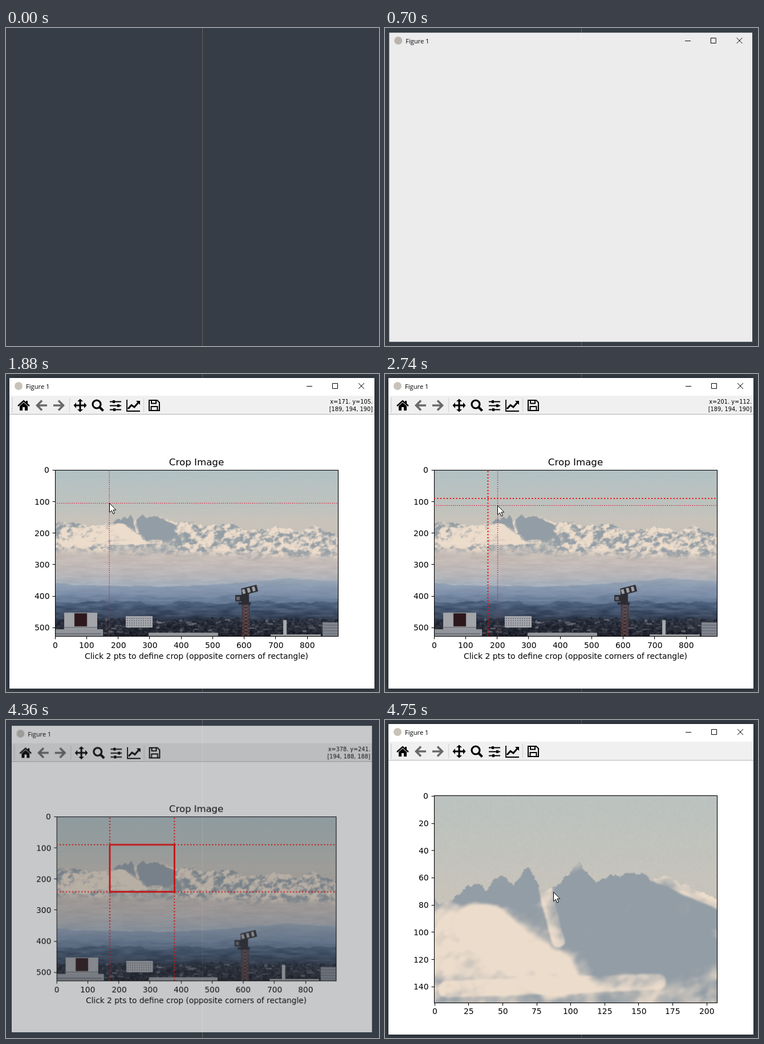
Write an HTML page with a canvas that moves like this. It is 654 px wide and 557 px high and loops after 6.62 s.

```html
<!DOCTYPE html>
<html lang="en">
<head>
<meta charset="utf-8">
<title>Crop Image</title>
<style>
html, body { margin: 0; width: 100%; height: 100%; overflow: hidden; background: #363d46; }
canvas { display: block; }
</style>
</head>
<body>
<canvas id="stage" width="654" height="557"></canvas>
<script>
const W = 654, H = 557, LOOP = 6620;
const IMG_W = 898, IMG_H = 527;
const LEFT = 86, WIDTH = 496;
const ctx = document.getElementById('stage').getContext('2d');

const clamp = v => Math.min(1, Math.max(0, v));
const lerp = (a, b, k) => a + (b - a) * k;
const mix = (a, b, k) => a.map((v, i) => lerp(v, b[i], k));
const smooth = (a, b, v) => { const k = clamp((v - a) / (b - a)); return k * k * (3 - 2 * k); };
const easeOut = k => 1 - (1 - clamp(k)) ** 2;
const rgb = hex => [1, 3, 5].map(i => parseInt(hex.slice(i, i + 2), 16));

function layer(w, h) {
  const c = document.createElement('canvas');
  c.width = w;
  c.height = h;
  return c.getContext('2d');
}

function box(g, x, y, w, h, fill) {
  g.fillStyle = fill;
  g.fillRect(x, y, w, h);
}

function path(g, d, color, width) {
  const p = new Path2D(d);
  if (width) {
    g.strokeStyle = color;
    g.lineWidth = width;
    g.stroke(p);
  } else {
    g.fillStyle = color;
    g.fill(p);
  }
}

function text(g, str, x, y, font, align = 'left') {
  g.font = font;
  g.textAlign = align;
  g.fillStyle = '#000';
  g.fillText(str, x, y);
}

// --- Landscape, in image pixels ---

function hash(i, j) {
  let h = Math.imul(i, 374761393) + Math.imul(j, 668265263);
  h = Math.imul(h ^ (h >>> 13), 1274126177);
  return ((h ^ (h >>> 16)) >>> 0) / 2 ** 32;
}

function noise(x, y) {
  const i = Math.floor(x), j = Math.floor(y);
  const u = smooth(0, 1, x - i), v = smooth(0, 1, y - j);
  return lerp(lerp(hash(i, j), hash(i + 1, j), u), lerp(hash(i, j + 1), hash(i + 1, j + 1), u), v);
}

// Layered noise around zero
function fbm(x, y) {
  return noise(x, y) * .5 + noise(x * 2 + 9, y * 2) * .3 + noise(x * 4, y * 4 + 9) * .2 - .5;
}

function seeded(seed) {
  return () => (seed = (seed * 16807) % 2147483647) / 2147483647;
}

// Piecewise blend through [position, value] stops
function along(stops, x, blend = lerp) {
  const i = stops.findIndex(s => s[0] > x);
  if (i === 0) return stops[0][1];
  if (i < 0) return stops[stops.length - 1][1];
  const [a, b] = [stops[i - 1], stops[i]];
  return blend(a[1], b[1], (x - a[0]) / (b[0] - a[0]));
}

const ramp = (...stops) => {
  const list = stops.map(([p, c]) => [p, rgb(c)]);
  return y => along(list, y, mix);
};

const SKY = ramp([0, '#b2c1c4'], [53, '#b8c2c1'], [105, '#bdc2be'], [160, '#c7c3bb'], [240, '#c9c0b8']);
const CLOUD = ramp([245, '#cbbfb6'], [300, '#c2bab7'], [330, '#b8b6b8'], [362, '#a6afba']);
const FAR = ramp([345, '#9aa7b6'], [375, '#8797ae'], [415, '#7386a2']);
const MID = ramp([395, '#788ba6'], [425, '#61758f']);
const NEAR = ramp([412, '#566984'], [435, '#475a75'], [470, '#333f53']);
const TOWN = ramp([462, '#2d3443'], [527, '#20232c']);
const SNOW = rgb('#ecdccb'), ROCK = rgb('#939da5');

const SKYLINE = [[0, 162], [110, 177], [171, 170], [218, 152], [229, 154], [240, 144], [251, 160], [260, 160],
  [278, 140], [290, 153], [313, 145], [335, 149], [380, 168], [415, 162], [483, 178], [560, 169], [610, 194],
  [700, 181], [785, 194], [823, 175], [860, 197], [898, 207]];
const HILLTOP = [[0, 358], [90, 366], [360, 369], [550, 360], [730, 343], [898, 352]];

// Snowy (+) and rocky (-) streaks: x1, y1, x2, y2, radius, weight
const STREAKS = [
  [40, 215, 200, 198, 30, .5],
  [205, 185, 258, 222, 17, .8],
  [252, 158, 262, 196, 5, .8],
  [335, 148, 382, 168, 6, .9],
  [180, 232, 335, 226, 6, .6],
  [290, 172, 350, 186, 34, -.7],
  [195, 158, 243, 156, 13, -.6],
  [300, 215, 375, 212, 17, -.35]
];

function streak(x, y, [x1, y1, x2, y2, r, weight]) {
  const dx = x2 - x1, dy = y2 - y1;
  const k = clamp(((x - x1) * dx + (y - y1) * dy) / (dx * dx + dy * dy));
  return weight * smooth(r * 1.25, r * .75, Math.hypot(x - x1 - dx * k, y - y1 - dy * k));
}

function mountain(x, y) {
  const bias = STREAKS.reduce((sum, s) => sum + streak(x, y, s), 0);
  const grain = fbm((x + y * .75) / 17, (y - x * .35) / 15);
  const calm = smooth(150, 190, x) * smooth(400, 360, x);
  return mix(ROCK, SNOW, smooth(-.45, .5, bias * .8 + grain * lerp(2.4, 1.1, calm) + lerp(.08, -.1, calm)));
}

function landscape(x) {
  const top = along(SKYLINE, x) + fbm(x / 11, .5) * 15;
  const far = along(HILLTOP, x) + fbm(x / 30, 3) * 6;
  const mid = 399 + fbm(x / 70, 5) * 26;
  const near = 418 + fbm(x / 60, 7) * 24;
  const town = 471 + fbm(x / 14, 11) * 22;
  return y => {
    const haze = fbm(x / 45, y / 7);
    const tint = (color, amount) => color.map(v => v + amount);
    if (y < top) return tint(SKY(y), (hash(x, y) - .5) * 4);
    if (y < far) {
      const cover = smooth(236, 272, y - x * .025 + haze * 24);
      const cloud = tint(CLOUD(y), haze * 22);
      return cover === 1 ? cloud : mix(mountain(x, y), cloud, cover);
    }
    if (y < mid) return tint(FAR(y), haze * 16);
    if (y < near) return tint(MID(y), haze * 28);
    if (y < town) return tint(NEAR(y), haze * 50);
    return tint(TOWN(y), fbm(x / 7, y / 5) * 60);
  };
}

// Buildings use stage coordinates
function paintTown(g) {
  const rnd = seeded(71);
  for (let i = 0; i < 110; i++) {
    const grey = 100 + rnd() * 70;
    box(g, 165 + rnd() * 415, 427 + rnd() * 26, 2 + rnd() * 9, 1 + rnd() * 3,
      `rgba(${grey},${grey},${grey + 8},${.15 + rnd() * .4})`);
  }
  box(g, 87, 447, 83, 12, '#92959b');
  box(g, 102, 418, 58, 29, '#a3a5a9');
  box(g, 102, 443, 58, 2, '#777a80');
  box(g, 87, 454, 80, 2, '#686c74');
  box(g, 120, 419, 22, 23, '#2d191d');
  box(g, 210, 424, 47, 20, '#a9aaae');
  for (let x = 212; x < 256; x += 4) for (let y = 427; y < 443; y += 4) box(g, x, y, 2, 2, '#6b707b');
  box(g, 250, 453, 122, 6, '#96989d');
  box(g, 464, 456, 88, 3, '#a9a9ac');
  box(g, 486, 431, 6, 25, '#a9abb0');
  box(g, 555, 435, 28, 24, '#838790');
  for (let y = 439; y < 458; y += 5) box(g, 555, y, 28, 1.5, '#666c77');
}

function paintCrane(g) {
  const dark = '#2c2c33';
  box(g, 414, 402, 13, 57, 'rgba(62,44,48,.6)');
  for (let y = 403; y < 459; y += 6) path(g, `M414 ${y}L427 ${y + 6}M427 ${y}L414 ${y + 6}`, '#7d5a56', .9);
  path(g, 'M414.5 402V459M426.5 402V459', '#49363b', 1.6);
  box(g, 402, 387, 22, 11, dark);
  box(g, 404, 390, 6, 6, '#66666c');
  box(g, 413, 378, 13, 26, dark);
  box(g, 408, 400, 21, 4, dark);
  g.save();
  g.translate(412, 376);
  g.rotate(-.25);
  box(g, 0, 0, 28, 12, dark);
  for (let x = 1; x < 28; x += 9) box(g, x, 2, 5, 8, '#a3a2a2');
  g.restore();
}

function paintPhoto() {
  const g = layer(IMG_W, IMG_H), pixels = g.createImageData(IMG_W, IMG_H);
  for (let x = 0; x < IMG_W; x++) {
    const colorAt = landscape(x);
    for (let y = 0; y < IMG_H; y++) pixels.data.set([...colorAt(y), 255], (y * IMG_W + x) * 4);
  }
  g.putImageData(pixels, 0, 0);
  g.scale(IMG_W / WIDTH, IMG_W / WIDTH);
  g.translate(-LEFT, -168);
  paintTown(g);
  paintCrane(g);
  return g.canvas;
}

const photo = paintPhoto();

// --- Figure window ---

const TICK = '13.89px "DejaVu Sans", sans-serif';

// src: visible part of the photo; ticks are spaced by xStep and yStep
const FIGURES = {
  full: { src: [0, 0, IMG_W, IMG_H], top: 168, bottom: 459.1, xStep: 100, yStep: 100 },
  crop: { src: [171, 90, 208, 152], top: 132.2, bottom: 494.7, xStep: 25, yStep: 20 }
};

function drawAxes(g, { src, top, bottom, xStep, yStep }) {
  const unit = WIDTH / src[2], y1 = Math.round(bottom) + .5;
  g.imageSmoothingQuality = 'high';
  g.drawImage(photo, ...src, LEFT, top, WIDTH, bottom - top);
  g.strokeStyle = '#000';
  g.lineWidth = 1.1;
  g.strokeRect(LEFT + .5, Math.floor(top) + .5, WIDTH, y1 - Math.floor(top) - .5);
  g.font = TICK;
  for (let v = 0; v < src[2] - 1; v += xStep) {
    const x = LEFT + (v + .5) * unit;
    path(g, `M${Math.floor(x) + .5} ${y1}v5`, '#000', 1.1);
    text(g, v, Math.round(x - g.measureText(v).width / 2), Math.round(bottom + 20.5), TICK);
  }
  for (let v = 0; v < src[3] - 1; v += yStep) {
    const y = top + (v + .5) * unit;
    path(g, `M${LEFT + .5} ${Math.floor(y) + .5}h-5`, '#000', 1.1);
    text(g, v, Math.round(76.3 - g.measureText(v).width), Math.round(y + 5), TICK);
  }
}

// Draws around a centre, turned by the given quarter turns
function turned(g, x, y, quarters, draw) {
  g.save();
  g.translate(x, y);
  g.rotate(quarters * Math.PI / 2);
  draw();
  g.restore();
}

function drawToolbar(g) {
  const ink = '#000', grey = '#696969';
  box(g, 6, 38, 640, 33, '#f0f0f0');
  box(g, 6, 70, 640, 1, '#b4b4b4');
  for (let y = 42; y < 68; y += 3) box(g, 10, y, 2, 1, '#b5b5b5');
  for (const x of [111, 241]) box(g, x, 42, 1, 25, '#d0d0d0');
  path(g, 'M21 56L31 47L41 56', ink, 2.4);
  path(g, 'M24 56L31 50L38 56V64H33V58H29V64H24ZM35 47H38V53L35 50Z', ink);
  for (const [x, turns] of [[62.5, 0], [92.5, 2]]) {
    turned(g, x, 55, turns, () => path(g, 'M9.5 0H-7M.5-8.5L-8 0L.5 8.5', grey, 3.6));
  }
  for (let i = 0; i < 4; i++) {
    turned(g, 130, 55, i, () => path(g, 'M-1.5 0V-7H-5L0-11.5L5-7H1.5V0Z', ink));
  }
  path(g, 'M166 53A7 7 0 1 1 152 53A7 7 0 1 1 166 53Z', ink, 3.2);
  path(g, 'M164 58L170.5 64.5', ink, 4);
  [189, 197, 190].forEach((x, i) => {
    box(g, 182, 47.5 + i * 7, 20, 2, ink);
    box(g, x - 2, 46 + i * 7, 4, 5, ink);
  });
  path(g, 'M212 45V65H235', ink, 1.8);
  path(g, 'M214 61L220 54.5L225 58L232 50', ink, 3);
  path(g, 'M228 47H235V54Z', ink);
  path(g, 'M251 46H265L269 50V64H251ZM255 46V51.5H263V46M254.5 64V57H265.5V64', ink, 2);
}

function drawTitleBar(g, buttons) {
  path(g, 'M15 21a7 7 0 1 0 14 0a7 7 0 1 0-14 0Z', '#c8c2b8');
  text(g, 'Figure 1', 35, 26, '11.2px "Open Sans", sans-serif');
  if (buttons) path(g, 'M527 21.5h10M572.5 16.5h9v9h-9ZM618 16l10 10M628 16l-10 10', '#000', 1);
}

function cross(g, [x, y], color, points) {
  const width = points * 100 / 72, { top, bottom } = FIGURES.full;
  g.setLineDash([width, width * 1.65]);
  path(g, `M${LEFT} ${y}h${WIDTH}M${x} ${bottom}V${top}`, color, width);
  g.setLineDash([]);
}

function drawStatus(g, [px, py]) {
  const font = '9.8px "DejaVu Sans", sans-serif';
  const x = Math.round((px - 86.8) / .5517), y = Math.round((py - 168.5) / .5517);
  const color = mix([189, 194, 190], [194, 188, 188], (y - 105) / 136).map(Math.round);
  text(g, `x=${x}. y=${y}.`, 643, 52, font, 'right');
  text(g, `[${color.join(', ')}]`, 643, 65, font, 'right');
}

// --- Timeline ---

const ENTRY = [525, 210], HOVER = [181.1, 226.4], FIRST = [180.5, 218], SECOND = [295.3, 301.5];
const T = { open: 550, pointer: 860, hover: 930, settle: 1880, aim: 2110, press: 2340, mark: 2660,
  press2: 3830, mark2: 4130, close: 4360, reopen: 4525 };
const FADE = 225, FADE_STEP = 75;

function cursorAt(t) {
  if (t < T.settle) return mix(ENTRY, HOVER, easeOut(smooth(T.pointer, T.settle - 100, t)));
  if (t < T.aim) return HOVER;
  return mix(FIRST, SECOND, easeOut(smooth(T.mark - 75, 3500, t)));
}

function drawCursor(g, [x, y]) {
  g.save();
  g.translate(Math.floor(x) + .5, Math.floor(y) + .5);
  const arrow = 'M0 0V16L3.8 12.6L6.4 18.5L9 17.4L6.4 11.6H11.4Z';
  path(g, arrow, '#fff');
  path(g, arrow, '#000', 1);
  g.restore();
}

function drawClick(g, [x, y]) {
  g.beginPath();
  g.arc(x, y, 12, 0, 7);
  g.fillStyle = 'rgba(255,255,0,.47)';
  g.fill();
}

// Scale, opacity and content of the window; fades advance in steps
function poseAt(t) {
  if (t < T.open) return { alpha: 0 };
  const since = start => Math.floor((t - start) / FADE_STEP) * FADE_STEP;
  if (t >= T.close && t < T.reopen) {
    const e = since(T.close);
    return { scale: .9875 - e * .00037, alpha: Math.max(0, .716 - e * .0058), figure: 'full' };
  }
  const again = t >= T.reopen, e = since(again ? T.reopen : T.open), k = easeOut(e / FADE);
  return { scale: lerp(.9586, 1, k), alpha: lerp(.16, 1, k), figure: e >= FADE && (again ? 'crop' : 'full') };
}

const win = layer(W, H);

function drawWindow(g, t, figure) {
  box(g, 6, 7, 640, 544, '#fff');
  drawTitleBar(g, t < T.close || t >= T.reopen);
  if (!figure) return;
  drawToolbar(g);
  drawAxes(g, FIGURES[figure]);
  if (figure === 'crop') return;
  text(g, 'Crop Image', 334, 160, '16.67px "DejaVu Sans", sans-serif', 'center');
  text(g, 'Click 2 pts to define crop (opposite corners of rectangle)', 334, 499, TICK, 'center');
  if (t < T.hover) return;
  drawStatus(g, cursorAt(t));
  if (t >= T.mark) cross(g, FIRST, '#f00', 1.5);
  if (t < T.mark2) return cross(g, cursorAt(t), '#dc143c', 1);
  cross(g, SECOND, '#f00', 1.5);
  g.strokeStyle = '#f00';
  g.lineWidth = 2.8;
  g.strokeRect(...FIRST, SECOND[0] - FIRST[0], SECOND[1] - FIRST[1]);
}

function render(t) {
  const { scale, alpha, figure } = poseAt(t);
  box(ctx, 0, 0, W, H, '#363d46');
  box(ctx, 344, 0, 1, H, '#63635f');
  if (!alpha) return;
  drawWindow(win, t, figure);
  const w = 640 * scale, h = 544 * scale, lag = 1 - scale;
  ctx.save();
  ctx.globalAlpha = alpha;
  if (alpha === 1) {
    ctx.shadowColor = 'rgba(0,0,0,.4)';
    ctx.shadowBlur = 12;
  }
  ctx.drawImage(win.canvas, 6, 7, 640, 544, 326 - lag * 30 - w / 2, 279 - lag * 25 - h / 2, w, h);
  ctx.restore();
  if (t < T.pointer || alpha < 1) return;
  const pos = cursorAt(t);
  const pressed = (start, length) => t >= start && t < start + length;
  if (pressed(T.press, 150) || pressed(T.press2, 70)) drawClick(ctx, pos);
  drawCursor(ctx, pos);
}

const start = performance.now();

function tick() {
  render(Math.max(0, performance.now() - start) % LOOP);
  requestAnimationFrame(tick);
}
tick();
</script>
</body>
</html>
```
